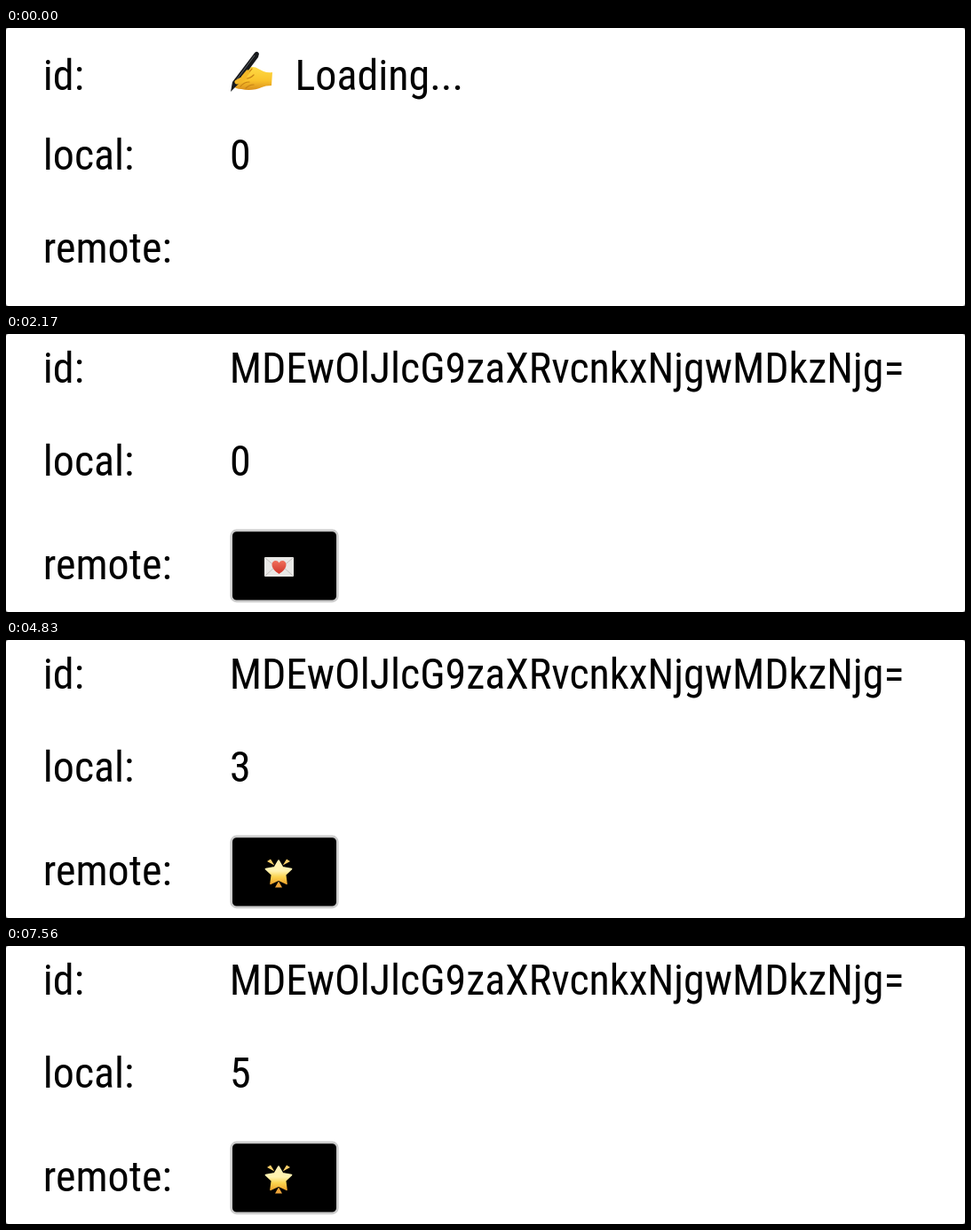
Write an HTML page that moves like this. It is 1080 px wide and 314 px high and loops after 7.63 s.

```html
<!DOCTYPE html>
<html lang="en">
<head>
<meta charset="utf-8">
<title>Counter</title>
<style>
  html, body { margin: 0; height: 100%; overflow: hidden; background: #777; }
  svg { display: block; width: 100vw; height: 100vh; }
  text { font: 48px "Roboto Condensed", Roboto, sans-serif; font-stretch: 75%; }
</style>
</head>
<body>
<svg viewBox="0 0 1080 314">
  <defs>
    <linearGradient id="gold" x2="0" y2="1">
      <stop offset="0" stop-color="#fff0b4"/>
      <stop offset=".45" stop-color="#fff3b0"/>
      <stop offset=".7" stop-color="#fbd450"/>
      <stop offset="1" stop-color="#f0a52c"/>
    </linearGradient>
    <linearGradient id="skin" x2="0" y2="1">
      <stop offset="0" stop-color="#ffdb45"/>
      <stop offset=".6" stop-color="#f9c22b"/>
      <stop offset="1" stop-color="#d98f1c"/>
    </linearGradient>
    <linearGradient id="red" x2="0" y2="1">
      <stop offset="0" stop-color="#f0705c"/>
      <stop offset="1" stop-color="#cf3429"/>
    </linearGradient>
  </defs>
  <rect width="1080" height="314" rx="3" fill="#fff"/>

  <text id="idLabel" data-x="41.8">id<tspan class="mark">:</tspan></text>
  <text data-x="41.8" data-y="160">local<tspan class="mark">:</tspan></text>
  <text id="remoteLabel" data-x="41.8">remote<tspan class="mark">:</tspan></text>
  <text id="count" data-x="252" data-y="160"></text>

  <g id="loading">
    <path fill="url(#skin)" d="M256 65C254 60 259 56 263 53L272 46C276 43 281 44 284 46L290 49Q295 51 300 50L299 65Q292 65 288 67C282 70 272 71 265 69Q258 69 256 65Z"/>
    <path fill="none" stroke="#c88316" stroke-width="1.2" stroke-linecap="round" d="M264 66Q268 61 274 61M270 68Q274 64 279 64M277 46L268 57Q274 58 279 53"/>
    <path fill="#17191c" d="M280 28Q283 25 285 29L284 33 261 64 253 72 255 61Z"/>
    <path stroke="#5d6267" stroke-width="1" d="M280 31L260 58"/>
    <path fill="none" stroke="#f4b828" stroke-width="5" stroke-linecap="round" d="M260 61L269 56M272 50L267 56"/>
    <text data-x="325.5" data-y="70">Loading<tspan class="dots">...</tspan></text>
  </g>

  <g id="loaded">
    <text data-x="251.7" data-y="55">MDEwOlJlcG9zaXRvcnkxNjgwMDkzNjg=</text>
    <g id="ring">
      <rect x="239" y="207" width="149" height="111" rx="11" fill="#cfdffb"/>
      <rect x="242" y="210" width="143" height="105" rx="8" fill="#7ba9f8"/>
      <rect x="249" y="217" width="129" height="90" rx="3" fill="#dbe6fc"/>
    </g>
    <rect id="button" x="253.7" y="221.9" width="119.6" height="80" rx="6" stroke-width="2.6"/>
    <g id="star">
      <path fill="url(#gold)" stroke="url(#gold)" stroke-width="1.6" stroke-linejoin="round" d="M307 249L311.6 256.8 321.5 258.6 314.6 265.2 316 275.4 307 271 298 275.4 299.4 265.2 292.5 258.6 302.4 256.8Z"/>
      <path fill="#f8cf68" d="M294 250L298 247.5 302.3 254.5ZM320 250L316 247.5 311.7 254.5Z"/>
      <path fill="#f0a63a" d="M307 272.5L311 279.5H303Z"/>
    </g>
    <g id="letter">
      <rect x="291" y="252" width="33" height="22" rx="1" fill="#e9e8e6"/>
      <path fill="none" stroke="#c3c1be" d="M292 273L303 263M323 273L312 263M292 253L305 264Q307.5 266 310 264L323 253"/>
      <path fill="url(#red)" d="M307.5 271C303 268 299.5 264.5 299.5 260.5C299.5 255.5 305.5 254.5 307.5 258.5C309.5 254.5 315.5 255.5 315.5 260.5C315.5 264.5 312 268 307.5 271Z"/>
    </g>
  </g>
</svg>
<script>
const LOOP = 7630, LOADED = 210;
// Each click: button pressed, released (request sent), reply received
const clicks = [
  [1890, 2170, 2380],
  [3010, 3220, 3430],
  [4060, 4200, 4620],
  [5110, 5250, 5530],
  [6370, 6440, 6790]
];
const $ = id => document.getElementById(id);
const show = (id, on) => $(id).setAttribute('display', on ? 'inline' : 'none');

// Use a condensed face where there is one, else condense the regular face
$('count').textContent = '0';
const condensed = $('count').getComputedTextLength() < 25.5;
const squeeze = condensed ? 1 : 0.88;
if (!condensed) {
  document.querySelectorAll('.mark').forEach(e => e.setAttribute('dx', 5));
  document.querySelectorAll('.dots').forEach(e => {
    e.setAttribute('dx', 1.5);
    e.style.letterSpacing = '2.9px';
  });
}

function place(text, y) {
  text.setAttribute('transform', `translate(${text.dataset.x} ${y}) scale(${squeeze} 1)`);
}
document.querySelectorAll('text[data-y]').forEach(e => place(e, e.dataset.y));

function draw(t) {
  const loaded = t >= LOADED;
  const pressed = clicks.some(([down, up]) => t >= down && t < up);
  const waiting = clicks.some(([, up, reply]) => t >= up && t < reply);

  show('loading', !loaded);
  show('loaded', loaded);
  show('ring', pressed);
  show('star', !waiting);
  show('letter', waiting);
  $('button').setAttribute('stroke', pressed ? '#8d9ab5' : '#cdcdcd');
  $('count').textContent = clicks.filter(c => t >= c[2]).length;
  place($('idLabel'), loaded ? 55 : 70);
  place($('remoteLabel'), loaded ? 277 : 265);
}

const start = performance.now();
function tick() {
  draw((performance.now() - start) % LOOP);
  requestAnimationFrame(tick);
}
tick();
</script>
</body>
</html>
```
